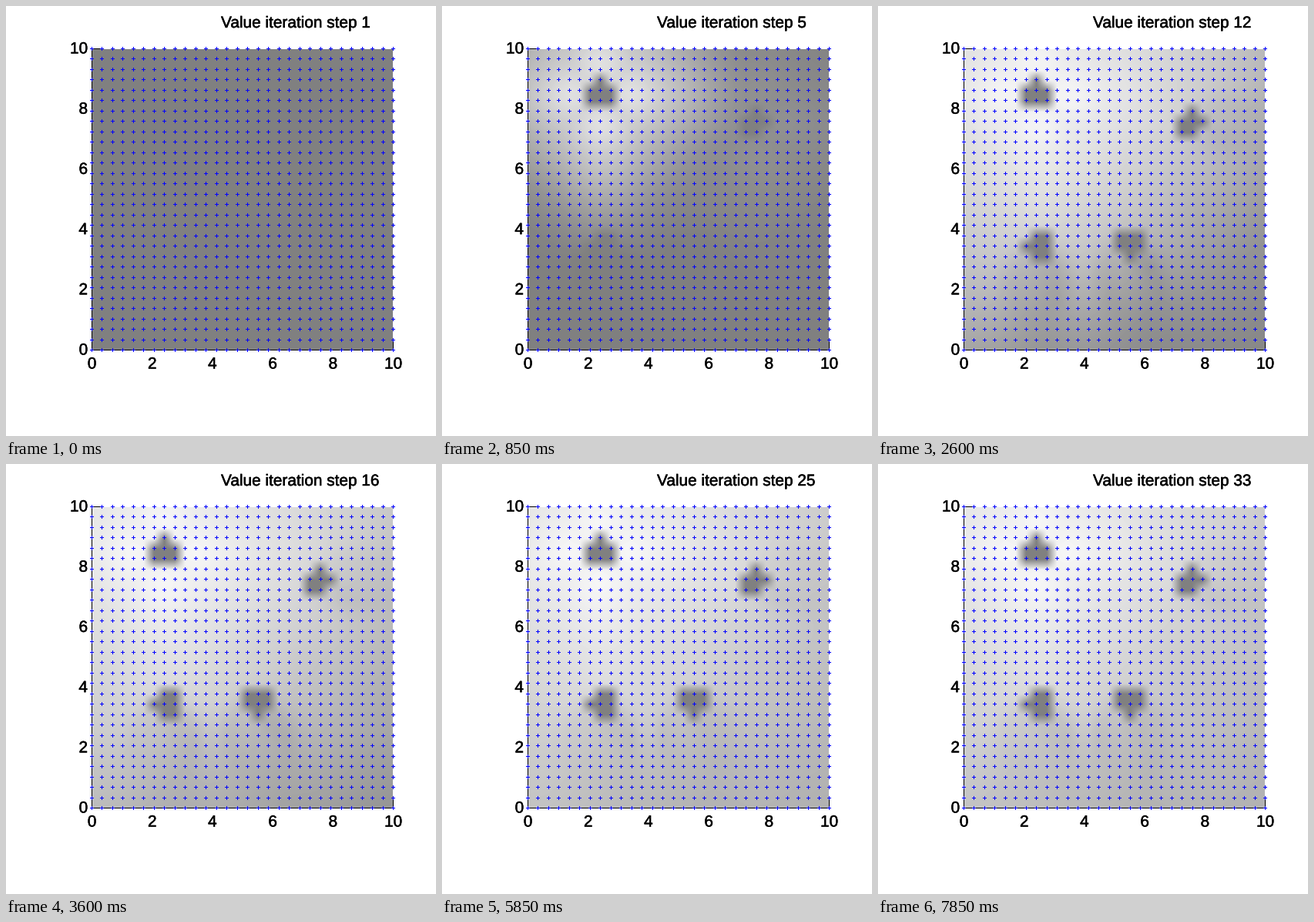
Write a matplotlib script that moves like this. It is 558x558 px and loops after 8 s.

```python
import numpy as np
import matplotlib.pyplot as plt
from matplotlib import patheffects
from matplotlib.animation import FuncAnimation

SIZE, DPI = 558, 72
LOOP, TICK, HOLD = 8000, 50, 250
LEFT, RIGHT, BOTTOM, TOP = 111, 502, 446, 55
N, WORLD = 30, 10.0
GAMMA, SIGMA, STEP, RADIUS = 0.942, 0.5, 1.0, 0.5
STEPS = 33
BLACK, BLUE = (0, 0, 0, 1), (0, 0, 1, 1)
# x, y, reward of the absorbing discs
DISCS = [(2.5, 8.5, 1.05), (7.5, 7.5, 0.2), (2.5, 3.5, -0.5), (5.5, 3.5, -0.5)]

grid = np.linspace(0, WORLD, N)


def hat_weights(points):
    """Linear interpolation weights of the grid values at the given points."""
    u = np.clip(points, 0, WORLD) / WORLD * (N - 1)
    return np.maximum(0, 1 - np.abs(u[..., None] - np.arange(N)))


def move(shift):
    """Expected interpolation weights after a noisy move along one axis."""
    z = np.linspace(-3.5, 3.5, 71)
    p = np.exp(-z ** 2 / 2)
    p /= p.sum()
    landing = grid[:, None] + shift + SIGMA * z
    return np.einsum("izk,z->ik", hat_weights(landing), p)


def value_iteration():
    gx, gy = np.meshgrid(grid, grid)
    reward = np.zeros((N, N))
    terminal = np.zeros((N, N), bool)
    for cx, cy, r in DISCS:
        inside = np.hypot(gx - cx, gy - cy) < RADIUS
        reward[inside] = r
        terminal |= inside
    stay, plus, minus = move(0), move(STEP), move(-STEP)
    actions = [(stay, plus), (stay, minus), (plus, stay), (minus, stay)]
    v = np.zeros((N, N))
    result = [v]
    for _ in range(STEPS - 1):
        target = np.where(terminal, reward, GAMMA * v)
        v = np.max([my @ target @ mx.T for my, mx in actions], axis=0)
        v = np.where(terminal, 0, v)
        result.append(v)
    return result


def px(x):
    return LEFT + (RIGHT - LEFT) * x / WORLD


def py(y):
    return BOTTOM + (TOP - BOTTOM) * y / WORLD


def overlay():
    """Axis lines and grid crosses on a transparent pixel layer."""
    layer = np.zeros((SIZE, SIZE, 4))
    layer[TOP:BOTTOM + 1, LEFT] = BLACK
    layer[BOTTOM, LEFT:RIGHT + 1] = BLACK
    layer[TOP, LEFT:LEFT + 15] = BLACK
    layer[BOTTOM - 14:BOTTOM + 1, RIGHT] = BLACK
    for r in np.rint(py(grid)).astype(int):
        for c in np.rint(px(grid)).astype(int):
            layer[r, c - 2:c + 3] = BLUE
            layer[r - 2:r + 3, c] = BLUE
    return layer


to_pixels = hat_weights(np.linspace(0, WORLD, RIGHT - LEFT))
images = [(to_pixels @ v @ to_pixels.T)[::-1] for v in value_iteration()]

plt.rcParams["font.family"] = "Liberation Sans"
fig = plt.figure(figsize=(SIZE / DPI, SIZE / DPI), dpi=DPI, facecolor="white")
ax = fig.add_axes([0, 0, 1, 1])
ax.axis("off")

picture = ax.imshow(images[0], cmap="gray", vmin=-1, vmax=1, aspect="auto",
                    interpolation="nearest",
                    extent=(LEFT, RIGHT, BOTTOM + 1, TOP + 1))
ax.imshow(overlay(), aspect="auto", interpolation="nearest",
          extent=(0, SIZE, SIZE, 0))
ax.set_xlim(0, SIZE)
ax.set_ylim(SIZE, 0)

bold = [patheffects.withStroke(linewidth=0.5, foreground="black")]


def label(x, y, text, align):
    return ax.text(x, y, text, fontsize=20.8, color="black", ha=align,
                   va="baseline", path_effects=bold)


for t in range(0, 11, 2):
    label(px(t) + 0.5, 470.5, str(t), "center")
    label(106, py(t) + 6.5, str(t), "right")

title = label(279, 28, "", "left")


def draw(i):
    step = min((i * TICK + 150) // HOLD, STEPS - 1)
    picture.set_data(images[step])
    title.set_text(f"Value iteration step {step + 1}")
    return picture, title


anim = FuncAnimation(fig, draw, frames=LOOP // TICK, interval=TICK,
                     repeat=True, repeat_delay=0, blit=False)
plt.show()
```
